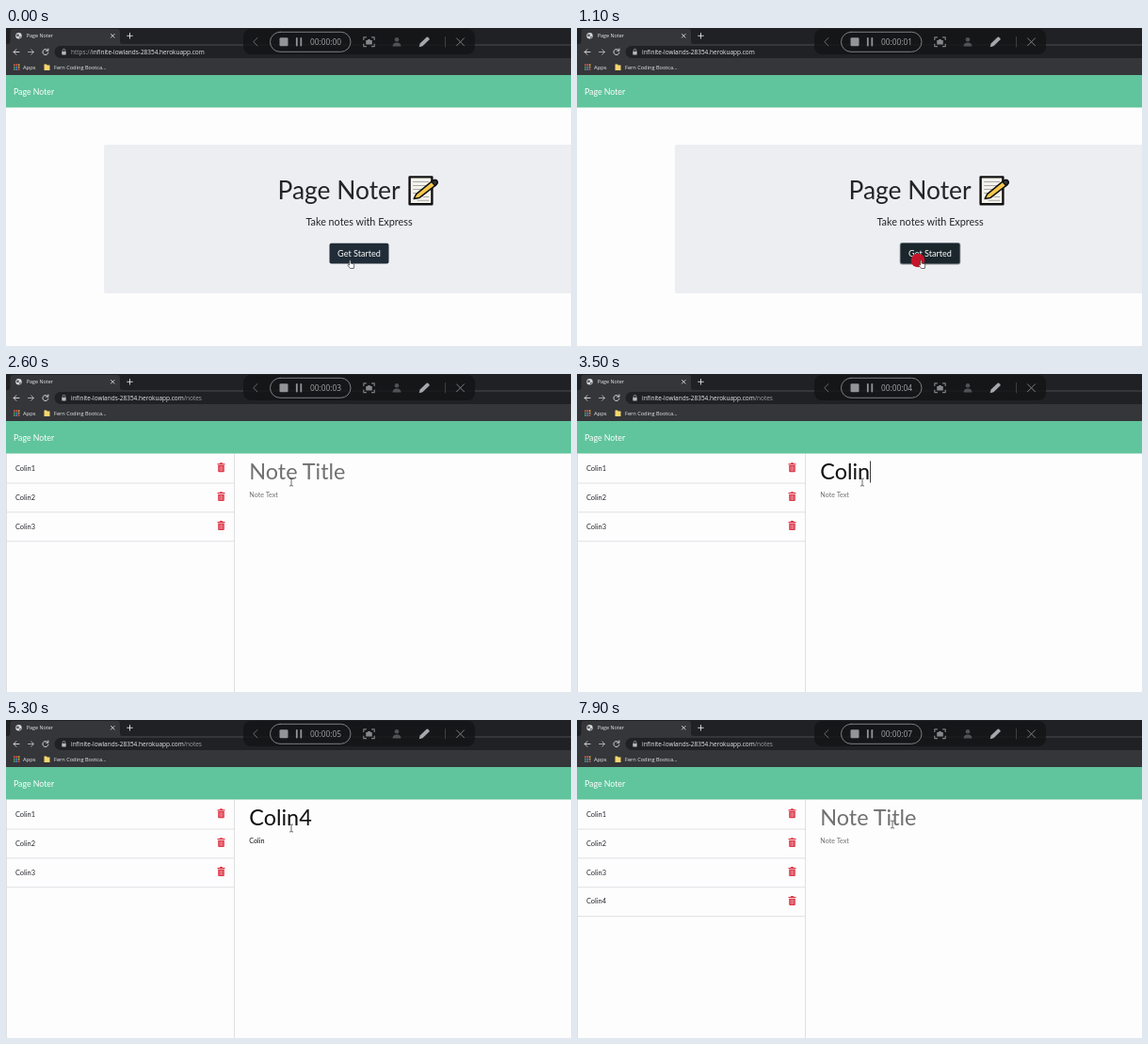
These frames come from a looping animation (600x338 px, 8 s). An HTML page:

```html
<!DOCTYPE html>
<html lang="en">
<head>
<meta charset="utf-8">
<title>Page Noter</title>
<style>
html, body { margin: 0; width: 100%; height: 100%; overflow: hidden; background: #fefdfe; }
svg { display: block; width: 100vw; height: 100vh; }
text { font-family: Lato, sans-serif; fill: #212529; white-space: pre; }
.ui text { font-family: "Open Sans", sans-serif; fill: #e8eaed; }
.ui .dim, .ui .dim tspan { fill: #9aa0a6; }
.line { fill: none; stroke-linecap: round; stroke-linejoin: round; }
.title { font-size: 23.4px; }
.body { font-size: 7.2px; }
.item { font-size: 7.4px; }
</style>
</head>
<body>
<svg viewBox="0 0 600 338">
  <defs>
    <clipPath id="tabClip"><rect x="20" y="0" width="86.5" height="17"/></clipPath>
    <linearGradient id="tabFade">
      <stop offset="0" stop-color="#35363a" stop-opacity="0"/>
      <stop offset="1" stop-color="#35363a"/>
    </linearGradient>
    <g id="trash" fill="#dc3545">
      <path d="M-4-4.1h2.3l.6-.9h2.2l.6.9H4v1.2h-8z"/>
      <path d="M-3.3-2.3h6.6v6.2q0 1-1 1h-4.6q-1 0-1-1z"/>
      <path class="line" d="M-1.5-1v4.5M0-1v4.5M1.5-1v4.5" stroke="#f3b9bf" stroke-width=".6"/>
    </g>
  </defs>

  <rect width="600" height="338" fill="#fefdfe"/>

  <g id="home">
    <rect x="104" y="124" width="510" height="158" rx="2" fill="#edeef2"/>
    <text x="288.5" y="182" font-size="26.4">Page Noter</text>
    <g stroke="#111" stroke-width="2.4" stroke-linejoin="round">
      <path d="M428.6 158.4h23.8v28.8h-23.8z" fill="#f4f2ec"/>
      <path class="line" d="M432.5 163.5h16M432.5 167.5h14M432.5 171.5h10M432.5 175.5h6M443 179.5h6M437 183.3h12" stroke="#aaa9a5" stroke-width="1"/>
      <path d="M433.2 181.4l2.4-4.8 17.4-14.2q3.4-2.1 4.7.2 1.200 2-1.100 4.200l-17.800 13.800z" fill="#f5c84c" stroke-width="1.500"/>
      <path d="M452 163.200l1-.8q3.400-2.100 4.700.2 1.200 2-1.100 4.200l-1 .8z" fill="#33363b" stroke-width="1.500"/>
    </g>
    <text x="375" y="210" font-size="10.8" text-anchor="middle">Take notes with Express</text>
    <rect id="ring" x="342.700" y="228" width="64.600" height="23.400" rx="2.500" fill="#8b949a"/>
    <rect id="button" x="343.500" y="228.800" width="63" height="21.800" rx="2"/>
    <text x="375" y="243" font-size="9.100" text-anchor="middle" style="fill:#fff">Get Started</text>
  </g>

  <g id="notes">
    <path class="line" d="M.5 85v253M242.500 85v253" stroke="#dfdfe2"/>
    <g id="list"></g>
    <text id="noteTitle" class="title" x="258.300" y="112"></text>
    <text id="noteBody" class="body" x="258.300" y="131"></text>
    <rect id="caret" fill="#222"/>
  </g>

  <rect y="50" width="600" height="34.500" fill="#60c49c"/>
  <text x="8" y="70.600" font-size="8.750" style="fill:#fff">Page Noter</text>

  <g class="ui">
    <rect width="600" height="50" fill="#35363a"/>
    <rect width="600" height="17" fill="#202124"/>
    <path d="M2 17q2.500 0 2.500-3V4q0-3 3-3h110.500q3 0 3 3v10q0 3 2.500 3z" fill="#35363a"/>
    <path d="M600 19H58a6.500 6.500 0 0 0 0 13h542z" fill="#202124"/>
    <circle cx="13.500" cy="8.300" r="3.200" fill="#d5d7da"/>
    <path d="M11.500 6.500l2 .3.600 1.400-1.600 1-1.500-.6zM14.800 8.800l1.300.4-1.300 1.700-1-.6z" fill="#55585c"/>
    <g clip-path="url(#tabClip)">
      <text id="tab" x="21.800" y="10.300" font-size="5.400"></text>
      <rect x="97" y="2" width="10" height="13" fill="url(#tabFade)"/>
    </g>
    <g class="line" stroke="#dfe1e5" stroke-width=".9">
      <path d="M111.500 6.500l3.600 3.600m0-3.600l-3.600 3.600M131.500 5.500v5.600M128.700 8.300h5.600"/>
      <path d="M14 25.500H8.200m2.600-2.700l-2.700 2.700 2.700 2.700"/>
      <path d="M23.500 25.500h5.800m-2.600-2.700l2.700 2.700-2.700 2.700" stroke="#b6b9bd"/>
      <path id="reload" d="M44.400 23.800a3 3 0 1 0 .5 2.400M44.900 22v2.200h-2.200"/>
      <path id="stop" d="M39.700 23.200l4.600 4.600m0-4.600l-4.600 4.600"/>
      <path d="M60.200 25v-1.300a1.300 1.300 0 0 1 2.600 0V25" stroke="#b6b9bd" stroke-width=".7"/>
    </g>
    <rect x="59.300" y="25" width="4.400" height="3.500" rx=".4" fill="#b6b9bd"/>
    <text x="69" y="27.800" font-size="6.470"><tspan id="scheme" class="dim">https://</tspan>infinite-lowlands-28354.herokuapp.com<tspan id="path" class="dim">/notes</tspan></text>
    <g id="apps"></g>
    <text x="18" y="43.600" font-size="5.800">Apps</text>
    <path d="M40.500 38.500h2.500l.8 1h2.700v5.500h-6z" fill="#f6d66f"/>
    <text x="51" y="43.600" font-size="5.600">Fern Coding Bootca...</text>

    <rect x="252" y="1" width="246" height="27" rx="8" fill="#141516" fill-opacity=".84"/>
    <g class="line" stroke="#7d7f82">
      <path d="M267 10.500l-4.300 4.200 4.300 4.200" stroke="#686a6d"/>
      <rect x="280.500" y="4.300" width="85.500" height="21" rx="10.500"/>
      <path d="M308.800 10.800v7.800M313.300 10.800v7.800" stroke-width="1.800" stroke="#929497"/>
      <path d="M379.800 12.500V9.800h2.700M388.500 9.800h2.700v2.700M391.200 17v2.700h-2.700M382.500 19.700h-2.700V17" stroke-width="1.200"/>
      <path d="M466.500 9.500v10.500" stroke="#3d3f42"/>
      <path d="M478.500 10.800l8 8m0-8l-8 8"/>
    </g>
    <rect x="290.500" y="10.300" width="9" height="9" rx="1.200" fill="#929497"/>
    <text id="timer" x="323" y="17.900" font-size="8.350" style="fill:#a5a7aa"></text>
    <path d="M382.200 12.900h1.600l.6-.9h2.200l.6.900h1.600v4.600h-6.600z" fill="#85878a"/>
    <g fill="#505255"><circle cx="415" cy="12.300" r="2.300"/><path d="M410.500 19.600q.2-4.200 4.500-4.200t4.500 4.200z"/></g>
    <path d="M438.700 20.200l.9-3.700 7-6.700q.8-.7 1.600 0l1.200 1.300q.7.800 0 1.500l-7 6.700z" fill="#a5a7aa"/>
  </g>

  <circle id="click" cx="362" cy="247" r="7.300" fill="#c51429"/>
  <g id="cursor">
    <path id="hand" d="M-1.300 1V-3.300q0-.9.700-.9t.7.900V-.9l2.700.6q1 .3 1 1.300l-.5 3.500h-3.700l-2.500-3q-.4-.6.200-.9.500-.2 1.400.4z" fill="#fff" stroke="#333" stroke-width=".7" stroke-linejoin="round"/>
    <path id="beam" class="line" d="M-1.600-4q1.600 0 1.600.7 0-.7 1.600-.7M0-3.300v6.600M-1.600 4q1.600 0 1.600-.7 0 .7 1.600.7" stroke="#3c3c3c" stroke-width=".75"/>
  </g>
</svg>
<script>
const LOOP = 8000, STEP = 100;
const NAME = 'Colin4';
const el = Object.fromEntries([...document.querySelectorAll('svg [id]')].map(e => [e.id, e]));
const show = (e, on) => e.style.display = on ? '' : 'none';
const passed = (times, t) => times.filter(at => t >= at).length;
const within = (t, from, to) => t >= from && t < to;

const ticks = [200, 1300, 2100, 3200, 4300, 5900, 6900];
const titleKeys = [2700, 3100, 3200, 3400, 3500, 3700];
const bodyKeys = [4800, 4900, 5000, 5200, 5300, 5900];
const track = [
  [1200, 366, 251], [1800, 350, 136], [2100, 303, 115], [6200, 303, 115],
  [6500, 453, 154], [6600, 453, 154], [6800, 494, 154],
  [7500, 460, 146], [7900, 335, 111]
];

el.apps.innerHTML = ['#e5594b', '#e5594b', '#e9b63c', '#54a868', '#5391e6', '#e9b63c', '#54a868', '#5391e6', '#e5594b']
  .map((fill, i) => `<rect x="${8 + i % 3 * 2.4}" y="${38.4 + (i / 3 | 0) * 2.4}" width="1.6" height="1.6" fill="${fill}"/>`).join('');

el.list.innerHTML = [1, 2, 3, 4].map((n, i) => `<g transform="translate(0 ${i * 30.9})">
  <text class="item" x="10" y="102.8">Colin${n}</text>
  <use href="#trash" x="228.5" y="99.3"/>
  <path d="M0 116h242" stroke="#dfdfe2"/></g>`).join('');

function position(t) {
  if (t <= track[0][0]) return track[0].slice(1);
  const i = track.findIndex(p => p[0] >= t);
  const [t0, x0, y0] = track[i - 1], [t1, x1, y1] = track[i];
  const k = (t - t0) / (t1 - t0);
  return [x0 + (x1 - x0) * k, y0 + (y1 - y0) * k];
}

function setField(node, typed, placeholder) {
  node.textContent = typed || placeholder;
  node.style.fill = typed ? '#111' : '#717171';
}

function setCaret(field, typed, height, bottom) {
  const x = 258.3 + (typed ? field.getComputedTextLength() : 0);
  const box = { x, y: bottom - height, width: height > 10 ? .9 : .6, height };
  for (const key in box) el.caret.setAttribute(key, box[key]);
}

function render(t) {
  const onNotes = t >= 1200, loading = within(t, 1200, 1300), saved = t >= 7500;
  show(el.home, !onNotes);
  show(el.notes, onNotes);
  show(el.path, onNotes);
  show(el.scheme, t < 500);
  show(el.stop, loading);
  show(el.reload, !loading);
  el.tab.textContent = loading ? 'https://infinite-lowlands-28354.herokuapp.com' : 'Page Noter';
  el.timer.textContent = '00:00:0' + passed(ticks, t);

  const hover = Math.min(1, Math.max(0, t / 300));
  el.button.style.fill = `rgb(${32 - 5 * hover},${44 - 6 * hover},${55 - 11 * hover})`;
  show(el.ring, t >= 1000);
  show(el.click, within(t, 1000, 1200));

  show(el.list, t >= 1400);
  show(el.list.lastElementChild, saved);
  const title = saved ? '' : NAME.slice(0, passed(titleKeys, t));
  const body = saved ? '' : NAME.slice(0, passed(bodyKeys, t));
  setField(el.noteTitle, title, 'Note Title');
  setField(el.noteBody, body, 'Note Text');

  const inTitle = within(t, 2100, 2600) || within(t, 2700, 3900);
  const inBody = within(t, 3900, 5300) || within(t, 5900, 6700);
  show(el.caret, inTitle || inBody);
  if (onNotes && inTitle) setCaret(el.noteTitle, title, 23, 115.5);
  if (onNotes && inBody) setCaret(el.noteBody, body, 8.4, 132.6);

  const [x, y] = position(t);
  el.cursor.setAttribute('transform', `translate(${x} ${y})`);
  show(el.cursor, !within(t, 6900, 7500));
  show(el.hand, t < 1400);
  show(el.beam, t >= 1400);
}

let start;
function frame(now) {
  start ??= now;
  render(Math.floor((now - start) % LOOP / STEP) * STEP);
  requestAnimationFrame(frame);
}
render(0);
requestAnimationFrame(frame);
</script>
</body>
</html>
```
